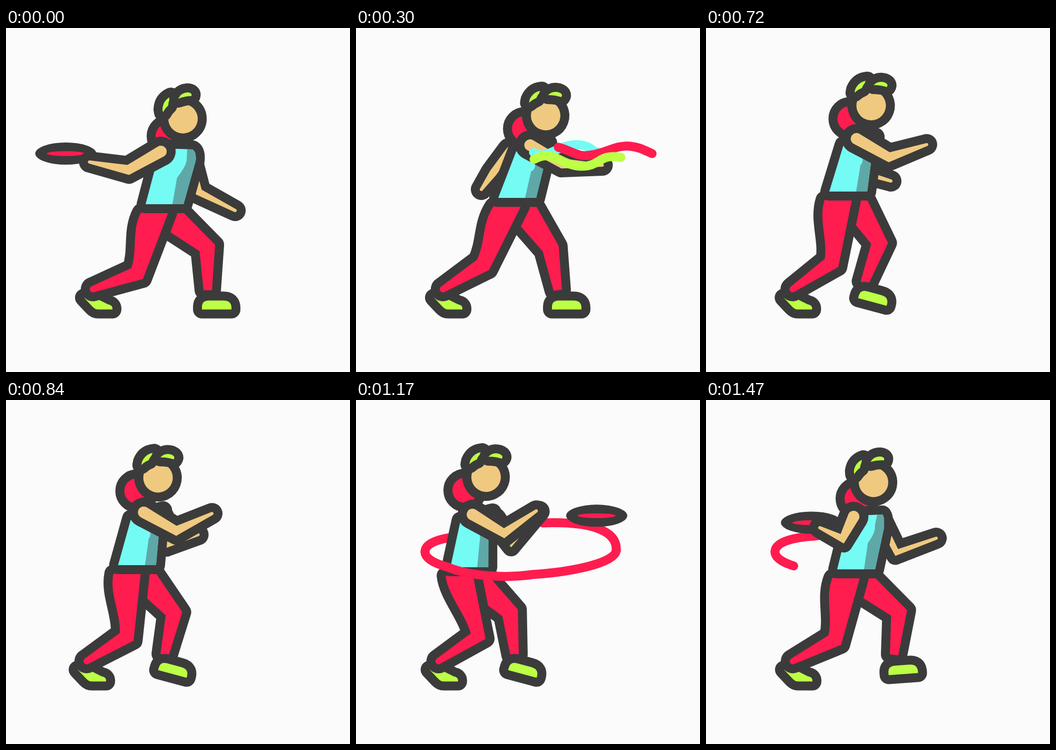
Write an HTML page that moves like this. It is 653x652 px and loops after 1.5 s.

```html
<!DOCTYPE html>
<html lang="en">
<head>
<meta charset="utf-8">
<title>Disc throw</title>
<style>
  html, body { margin: 0; height: 100%; overflow: hidden; background: #fbfbfb; }
  svg { display: block; width: 100vw; height: 100vh; }
  .ink { stroke: #3b3b3b; stroke-width: 34; stroke-linejoin: round; paint-order: stroke; }
  .trail { fill: none; stroke: #ff1c4f; stroke-width: 17; stroke-linecap: round; }
  .red { fill: #ff1c4f; } .skin { fill: #f0c980; } .cyan { fill: #74fcf4; }
  .teal { fill: #5fa8a8; } .lime { fill: #bcff45; }
</style>
</head>
<body>
<svg viewBox="0 0 653 652">
  <path id="loopIn" class="trail"/>
  <path id="loopOut" class="trail"/>
  <path id="backArm" class="ink skin"/>
  <circle id="hair" class="ink red" r="24"/>
  <path id="backLeg" class="ink red"/>
  <path id="frontShoe" class="ink lime" d="M-28 8.5v-5q0-12 13-12h28q15 0 15 14v3z"/>
  <path id="rearShoe" class="ink lime" d="M-2 1L14 18Q19 23.500 25 23.500H52Q53 15 43 13.500L26 5Z"/>
  <path id="frontLeg" class="ink red"/>
  <path id="torso" class="ink cyan"/>
  <path id="shade" class="teal"/>
  <g id="head">
    <circle class="ink skin" r="28"/>
    <path class="ink lime" d="M-39-18Q-38-35-23-42Q-28-33-28-25Q-34-20-38-12Z"/>
    <path class="ink lime" d="M-9-38Q-4-49 8-50Q18-50 16-43Q4-43-9-38Z"/>
  </g>
  <g id="disc">
    <ellipse rx="58" ry="21" fill="#3b3b3b"/>
    <ellipse class="red" rx="36" ry="4.500"/>
  </g>
  <path id="frontArm" class="ink skin"/>
  <path id="loopFront" class="trail"/>
  <path id="waveCyan" class="trail" style="stroke:#74fcf4" d="M337 236C362 252 380 222 418 221Q440 221 455 236Q490 222 522 230Q552 252 580 228"/>
  <path id="waveRed" class="trail" d="M384 226C415 235 420 245 445 241C480 236 490 222 520 224C540 226 550 233 562 238"/>
  <path id="waveLime" class="trail" style="stroke:#bcff45" d="M338 249C375 228 390 262 428 262C465 262 460 238 502 245C515 248 525 237 542 237C560 238 566 246 579 253"/>
</svg>
<script>
const LOOP = 1500;
const $ = id => document.getElementById(id);

// Rig controls at the key times; everything else follows from them.
const TIMES = [0, 300, 480, 720, 990, 1320, 1470];
const CONTROLS = {
  hipX:   [301, 306, 303, 270, 227, 211, 285],
  hipY:   [334, 322, 321, 310, 317, 317, 321],
  lean:   [28, 34, 34, 27, 22, 18, 25],
  twist:  [1, 0, 0, 0, 0, 0, 0.75],       // chest turned to the viewer
  reach:  [-1, 1, 1, 1, 1, 0.9, -0.35],   // throwing arm back or forward
  lift:   [15, -3, 5, 24, 40, 43, 21],    // forearm height
  elbowX: [65, -46, -42, 30, 81, 78, 77],
  elbowY: [-23, -47, -46, -35, -45, -44, -32],
  handX:  [134, -68, -63, 81, 137, 129, 152],
  handY:  [12, -16, -15, -20, -107, -103, -59],
  footX:  [400, 400, 391, 318, 318, 318, 374],
  footY:  [525, 525, 517, 511, 511, 511, 511],
  footR:  [0, 0, 13, 15, 15, 15, -4]
};
const COUNT = TIMES.length;

const clamp = (x, lo = 0, hi = 1) => Math.min(hi, Math.max(lo, x));
const span = (t, a, b) => clamp((t - a) / (b - a));
const mix = (a, b, u) => a + (b - a) * u;
const mix2 = (p, q, u) => p.map((v, i) => mix(v, q[i], u));
const add = (p, x, y) => [p[0] + x, p[1] + y];
const along = (p, v, k) => add(p, v[0] * k, v[1] * k);
const poly = pts => `M${pts.join('L')}Z`;
const bump = (t, mid, width) => Math.cos(clamp((t - mid) / width, -1, 1) * Math.PI / 2) ** 2;
const wrap = i => (i + COUNT) % COUNT;
const timeAt = i => TIMES[wrap(i)] + LOOP * Math.floor(i / COUNT);

// Piecewise linear curve through [time, value] pairs.
function ramp(t, ...stops) {
  for (let i = 1; i < stops.length; i++) {
    const [a, u] = stops[i - 1], [b, v] = stops[i];
    if (t <= b) return mix(u, v, span(t, a, b));
  }
  return stops[stops.length - 1][1];
}

// Periodic monotone cubic through one control's keys.
function sample(keys, t) {
  let i = COUNT - 1;
  while (TIMES[i] > t) i--;
  const h = timeAt(i + 1) - timeAt(i), u = (t - timeAt(i)) / h;
  const rate = k => (keys[wrap(k + 1)] - keys[wrap(k)]) / (timeAt(k + 1) - timeAt(k));
  const slope = k => {
    const a = rate(k - 1), b = rate(k);
    return a * b <= 0 ? 0 : 2 * a * b / (a + b);
  };
  return mix(keys[i], keys[wrap(i + 1)], u * u * (3 - 2 * u)) +
    h * u * (1 - u) * ((1 - u) * slope(i) - u * slope(i + 1));
}

function unit([x, y]) {
  const l = Math.hypot(x, y) || 1;
  return [x / l, y / l];
}
const normal = (p, q) => unit([p[1] - q[1], q[0] - p[0]]);
const jointNormal = (a, b, c) => {
  const n = normal(a, b), m = normal(b, c);
  return unit([n[0] + m[0], n[1] + m[1]]);
};

// Knee position of a two-bone leg.
function knee(hip, ankle, upper, lower) {
  const dx = ankle[0] - hip[0], dy = ankle[1] - hip[1];
  const d = Math.min(Math.hypot(dx, dy), upper + lower);
  const a = (upper * upper - lower * lower + d * d) / (2 * d);
  const h = Math.sqrt(Math.max(0, upper * upper - a * a));
  return along(along(hip, unit([dx, dy]), a), normal(hip, ankle), -h);
}

// All joints of the body at one moment.
function bodyAt(time) {
  const t = time < 300 ? Math.min(300, time * 1.25) : time;   // quick throw, then settle
  const c = {};
  for (const name in CONTROLS) c[name] = sample(CONTROLS[name], t);
  const { lean, twist, reach, lift } = c;
  const hip = [c.hipX, c.hipY];

  const shoulder = add(hip, lean * 1.25 - 18 - 24 * twist, -100);
  const elbow = add(shoulder, 62 * reach, 35 + 8 * (1 - reach * reach));
  const swing = Math.sign(reach) * Math.sqrt(Math.abs(reach));
  const hand = add(elbow, swing * Math.sqrt(75 * 75 - lift * lift), -lift);
  const head = add(hip, lean * 1.5 + 3 - 10 * twist, lean - 190);

  return {
    hip, lean, twist, reach, head, hand,
    headTurn: 20 * (1 - twist),
    hair: add(head, 12 * twist - 40, 25 + 8 * twist),
    frontArm: [shoulder, elbow, hand],
    backArm: [
      add(hip, 16 + 31 * clamp(c.handX / 70, -1, 1), -90),
      add(hip, c.elbowX, c.elbowY),
      add(hip, c.handX, c.handY)],
    frontFoot: [c.footX, c.footY],
    frontTurn: c.footR,
    rearAnkle: [165 - 24 * bump(t, 990, 300), 495 - 12 * bump(t, 1320, 150)],
    rearTurn: 12 * bump(t, 1320, 150)
  };
}

function armPath([s, e, h], rs, re, rh) {
  const a = normal(s, e), b = normal(e, h), m = jointNormal(s, e, h);
  const arc = (r, p) => `A${r} ${r} 0 0 0 ${p}`;
  const start = along(s, a, rs);
  return `M${start}L${along(e, m, re)}L${along(h, b, rh)}${arc(rh, along(h, b, -rh))}` +
    `L${along(e, m, -re)}L${along(s, a, -rs)}${arc(rs, start)}Z`;
}

function frontLegPath(hip, ankle) {
  const top = add(hip, -19, 16), k = knee(top, ankle, 120, 89);
  const m = jointNormal(top, k, ankle), n = normal(k, ankle);
  const back = add(top, -26, 0), bend = along(k, m, 15);
  const bulge = add(mix2(back, bend, 1 / 3), -12, 0);
  const tuck = add(mix2(back, bend, 2 / 3), 6, 0);
  return `M${back}C${bulge} ${tuck} ${bend}L${along(ankle, n, 6)}` +
    `A6 6 0 0 0 ${along(ankle, n, -6)}L${along(k, m, -15)}L${add(top, 26, 0)}Z`;
}

function backLegPath(hip, foot) {
  const top = add(hip, 22, 22), ankle = add(foot, -17, -28);
  const k = knee(top, ankle, 85, 80);
  const m = jointNormal(top, k, ankle), n = normal(k, ankle);
  return poly([add(top, -6, -6), add(top, 14, -6), along(k, m, -16), along(ankle, n, -8),
    along(ankle, n, 8), along(k, m, 16), add(top, -22, 24)]);
}

const shape = (id, d) => $(id).setAttribute('d', d);
const place = (id, [x, y], turn = 0, size = 1) =>
  $(id).setAttribute('transform', `translate(${x} ${y}) rotate(${turn}) scale(${size})`);

function drawTorso({ hip, lean, twist }) {
  const left = add(hip, -36, 0), right = add(hip, 36, 0);
  const neck = add(right, lean - 11, -104);
  const chest = add(right, lean - 19 + 14 * twist, -61 - 21 * twist);
  const side = `${neck}Q${chest[0] + 2} ${neck[1] + 5} ${chest}L${right}`;
  shape('torso', `M${left}L${add(left, lean, -88 - 18 * twist)}L${side}Z`);
  shape('shade', `M${add(neck, -10, 0)}L${side}L${add(right, -21, 0)}` +
    `L${add(right, lean * 0.45 - 25, -50)}Q${add(chest, -15, 6)} ${add(chest, -17, -6)}Z`);
}

// Show a path only between two distances along it.
function trim(el, tail, head, len) {
  const a = Math.max(0, tail), size = Math.min(len, head) - a;
  el.style.display = size > 0.5 ? '' : 'none';
  el.style.strokeDasharray = `${Math.max(0, size)} ${len * 3}`;
  el.style.strokeDashoffset = -a;
}

function drawWave(id, head, tail) {
  const el = $(id), len = el.getTotalLength();
  trim(el, tail * len, head * len, len);
}

function drawWaves(t) {
  drawWave('waveCyan', ramp(t, [210, 0], [300, 0.5], [390, 1]), ramp(t, [300, 0], [530, 1]));
  drawWave('waveRed', span(t, 210, 300), span(t, 300, 450));
  drawWave('waveLime', ramp(t, [210, 0], [300, 0.68], [360, 1]), ramp(t, [300, 0], [515, 1]));
}

// A ribbon that circles the body: behind, across the front, behind again.
function drawLoop(t) {
  const s = span(t, 990, 1320), drop = 266 + 36 * s;
  const parts = {
    loopIn: `M355 233C440 230 497 245 494 ${drop}`,
    loopFront: `M494 ${drop}C490 ${297 + 26 * s} 400 ${315 + 21 * s} 335 ${322 + 16 * s}` +
      'C270 340 205 330 175 317Q131 305 131 288',
    loopOut: 'M131 288C131 268 170 260 205 258L260 250'
  };
  const head = ramp(t, [870, 0], [990, 318], [1200, 760]);
  const tail = ramp(t, [1170, 0], [1320, 245], [1470, 515], [1500, 760]);
  let start = 0;
  for (const id in parts) {
    shape(id, parts[id]);
    const len = $(id).getTotalLength();
    trim($(id), tail - start, head - start, len);
    start += len;
  }
}

function heldDisc(t) {
  const { hand, reach } = bodyAt(t);
  return add(hand, 45 * reach, 10 * reach - 6);
}

function drawDisc(t) {
  const far = [535, 225], thrown = 180, caught = 1230;
  if (t < thrown || t >= caught) place('disc', heldDisc(t));
  else if (t < 300) {
    place('disc', mix2(heldDisc(thrown), far, span(t, thrown, 285)), 0, 1 - span(t, 240, 285));
  } else {
    place('disc', mix2(far, heldDisc(caught), span(t, 1110, caught)), 0, span(t, 1110, 1170));
  }
}

function draw(t) {
  const b = bodyAt(t);
  shape('frontArm', armPath(b.frontArm, 11, 9.5, 3));
  shape('backArm', armPath(b.backArm, 7, 7, 3));
  shape('frontLeg', frontLegPath(b.hip, b.rearAnkle));
  shape('backLeg', backLegPath(b.hip, b.frontFoot));
  place('head', b.head, b.headTurn);
  place('hair', b.hair);
  place('frontShoe', b.frontFoot, b.frontTurn);
  place('rearShoe', add(b.rearAnkle, -15, 15), b.rearTurn);
  drawTorso(b);
  drawDisc(t);
  drawLoop(t);
  drawWaves(t);
}

function tick() {
  const step = Math.floor((performance.now() + 1) / 30) * 30;
  draw(step % LOOP);
  requestAnimationFrame(tick);
}
tick();
</script>
</body>
</html>
```
